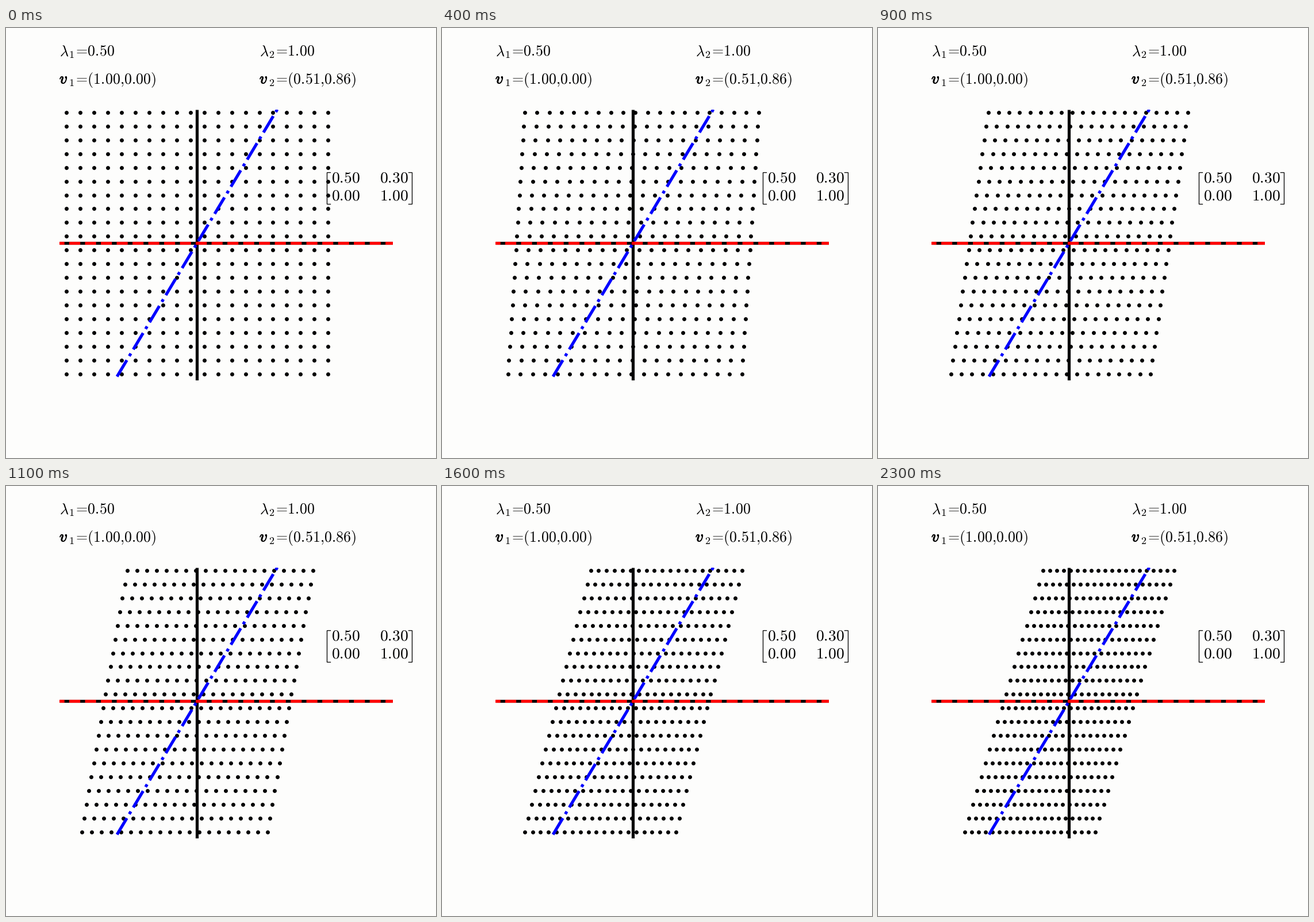
A matplotlib script that plays this animation: 748 by 748 pixels, repeating every 2.4 s.

```python
import numpy as np
import matplotlib.pyplot as plt
from matplotlib import patheffects
from matplotlib.animation import FuncAnimation
from matplotlib.patches import Rectangle

SIZE, DPI = 748, 68
PT = 72 / DPI                      # points per pixel
FRAMES, MOVING = 24, 19            # the last frames hold the final pose
CX, CY = 332.5, 374
LINE = 5.19 * PT
A = np.array([[0.5, 0.3], [0.0, 1.0]])

plt.rcParams["mathtext.fontset"] = "cm"

fig = plt.figure(figsize=(SIZE / DPI, SIZE / DPI), dpi=DPI, facecolor="#fdfdfc")
ax = fig.add_axes([0, 0, 1, 1])
ax.set(xlim=(0, SIZE), ylim=(SIZE, 0))
ax.axis("off")
plot_area = Rectangle((93.5, 142), 579.7, 471, transform=ax.transData)


def line(xs, ys, color, style="-"):
    item, = ax.plot(xs, ys, color=color, ls=style, lw=LINE,
                    solid_capstyle="butt", dash_capstyle="butt", zorder=3)
    item.set_clip_path(plot_area)


def label(x, y, text, size=25.96, **kw):
    return ax.text(x, y, text, fontsize=size * PT, va="baseline", **kw)


def eigen_labels(x, index, value, vector):
    label(x, 49, r"$\lambda$")
    v = label(x, 96.5, "$v$", 27)
    v.set_path_effects([patheffects.withStroke(linewidth=1.1 * PT, foreground="black")])
    for y, text in ((49, value), (96.5, vector)):
        # negative spaces close up the relation sign
        label(x + 15.5, y, rf"$_{index}\hspace{{-0.12}}=\hspace{{-0.2}}\mathsf{{{text}}}$")


eigen_labels(93, 1, "0.50", "(1.00{,}0.00)")
eigen_labels(441, 2, "1.00", "(0.51{,}0.86)")

# matrix with its brackets
for row, y in zip(A, (268.5, 299)):
    for value, x in zip(row, (590.5, 674.5)):
        label(x, y, f"${value:.2f}$", 27.5, ha="center")
for x, tip in ((558.5, 564.5), (706.5, 700.5)):
    ax.plot([tip, x, x, tip], [250.5, 250.5, 305.5, 305.5],
            color="black", lw=1.3 * PT, solid_joinstyle="miter")

# axes and eigenvector directions
line([93.5, 673.2], [CY, CY], "black")
line([CX, CX], [142, 613], "black")
line([81.7, 690], [CY, CY], "red", "--")
reach = np.array([-1, 1]) * 232.3
line(CX + 0.6 * reach, CY - reach, "blue", "-.")

# grid of points, y up
steps = np.linspace(-227.4, 227.4, 20)
grid = np.array([g.ravel() for g in np.meshgrid(steps, steps)])
dots, = ax.plot([], [], ".", color="black", ms=10.38 * PT, mew=1.73 * PT, zorder=2)


def update(i):
    t = min(i / MOVING, 1)
    x, y = ((1 - t) * np.eye(2) + t * A) @ grid
    dots.set_data(CX + 0.3 + x, CY + 0.3 - y)
    return dots,


anim = FuncAnimation(fig, update, frames=FRAMES, interval=100, repeat=True)
plt.show()
```
